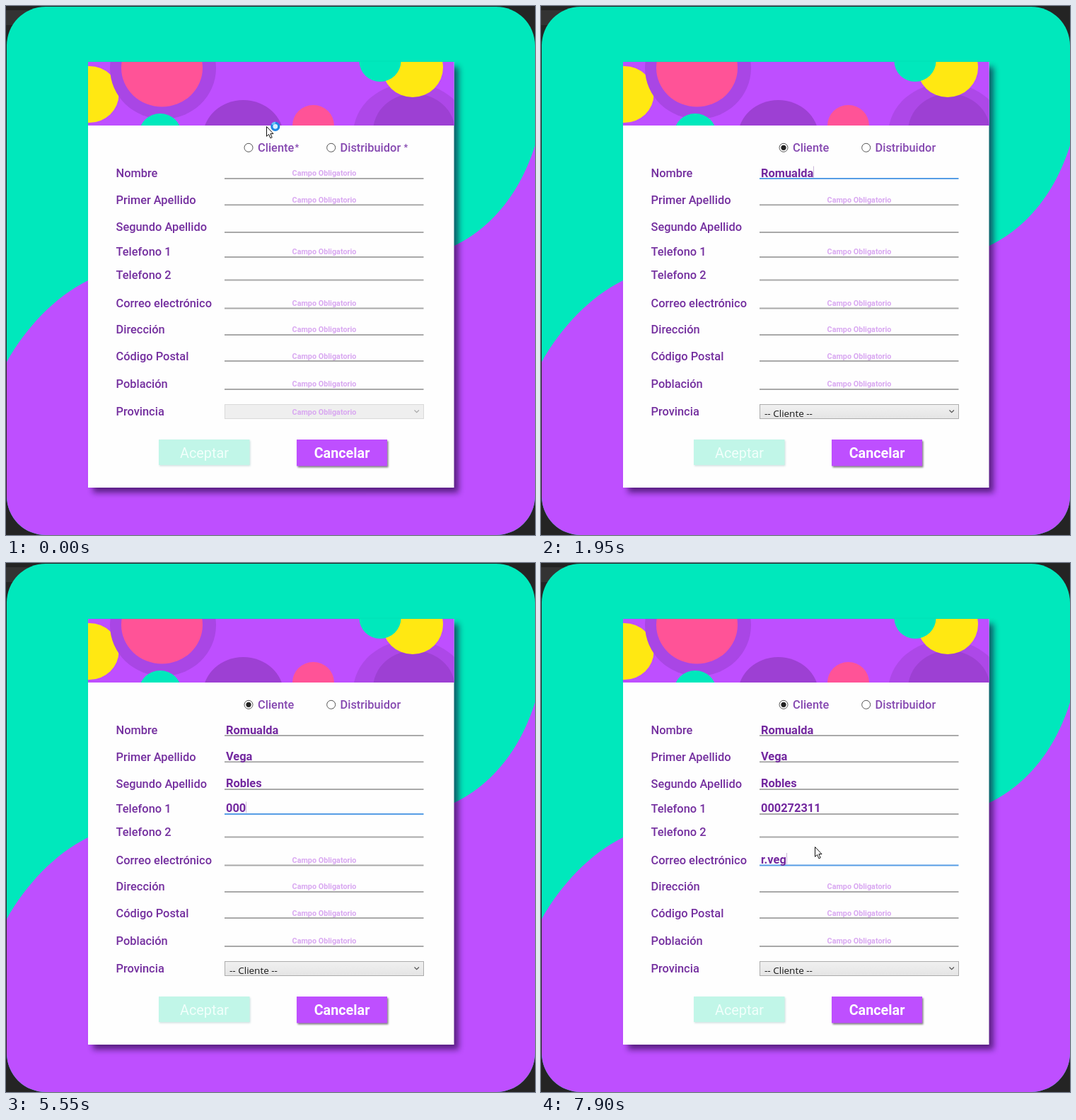
Recreate the animation shown at these times as an HTML page. Size 748x748 px, loop 8000 ms.

```html
<!DOCTYPE html>
<html lang="es">
<head>
<meta charset="utf-8">
<style>
  html, body { margin: 0; width: 100%; height: 100%; overflow: hidden; background: #242424; }
  svg { display: block; width: 100vw; height: 100vh; }
  text { font-family: Roboto, "Open Sans", sans-serif; font-size: 16.4px; white-space: pre; }
  .label { fill: #742f9f; font-weight: 500; }
  .choice { fill: #8548b0; font-weight: 500; }
  .value { fill: #73289f; font-weight: 700; }
  .hint { fill: #d9a8f1; font-weight: 700; font-size: 10.8px; text-anchor: middle; }
  .button { font-size: 19.8px; text-anchor: middle; fill: #fff; }
  .radio { fill: #fff; stroke: #555; }
</style>
</head>
<body>
<svg id="stage" viewBox="0 0 748 748" xmlns="http://www.w3.org/2000/svg">
  <defs>
    <clipPath id="window"><rect x="1" y="1" width="747" height="747" rx="55"/></clipPath>
    <clipPath id="banner"><rect x="116" y="79" width="517.5" height="90"/></clipPath>
    <linearGradient id="selectFill" x2="0" y2="1">
      <stop stop-color="#f0f0f0"/><stop offset="1" stop-color="#e5e5e5"/>
    </linearGradient>
    <filter id="blur" x="-10%" y="-10%" width="120%" height="120%"><feGaussianBlur stdDeviation="4"/></filter>
    <filter id="soft" x="-10%" y="-20%" width="120%" height="150%"><feGaussianBlur stdDeviation="1"/></filter>
  </defs>

  <rect width="748" height="748" fill="#242424"/>
  <rect y="6" width="36" height="21" fill="#333"/>
  <g clip-path="url(#window)">
    <rect width="748" height="748" fill="#00e8bc"/>
    <path d="M0 505C28 455 68 412 116 388L634 339C688 313 728 262 748 197V748H0Z" fill="#be4fff"/>
    <rect x="123" y="86" width="517" height="602" fill="#180030" opacity=".6" filter="url(#blur)"/>
  </g>

  <rect x="116" y="79" width="517.5" height="602" fill="#fefefe"/>
  <g id="bubbles" clip-path="url(#banner)">
    <rect x="116" y="79" width="518" height="90" fill="#be4fff"/>
  </g>

  <circle class="radio" cx="343" cy="200.3" r="6"/>
  <circle class="radio" cx="459.7" cy="200.3" r="6"/>
  <circle id="dot" cx="343" cy="200.3" r="3.6" fill="#222"/>
  <text class="choice" x="356" y="206">Cliente</text>
  <text class="choice" x="472.5" y="206">Distribuidor</text>
  <g id="stars">
    <text class="choice" x="408.5" y="204" style="font-size:13px">*</text>
    <text class="choice" x="562.5" y="204" style="font-size:13px">*</text>
  </g>

  <g id="fields"></g>
  <rect id="caret" width="1" height="16" fill="#c9b5d8"/>

  <text class="label" x="155.5" y="579">Provincia</text>
  <rect id="select" x="309.5" y="563.5" width="281" height="20"/>
  <path id="chevron" d="M577.5 571.5L580.7 574.7 583.9 571.5" fill="none" stroke-width="1.2"/>
  <text id="selectHint" class="hint" x="450" y="577.5">Campo Obligatorio</text>
  <text id="selectText" x="316" y="581" style="font:13.5px 'Open Sans','Noto Sans',sans-serif" fill="#1a1a1a">-- Cliente --</text>

  <rect x="217" y="614.5" width="128.5" height="36" fill="#9bb" opacity=".45" filter="url(#soft)"/>
  <rect x="216" y="613" width="128.5" height="36" fill="#c1f6e8"/>
  <text class="button" x="280.5" y="638.5" style="fill:#f1fffb">Aceptar</text>
  <rect x="412.5" y="615" width="128" height="37.5" fill="#333" opacity=".6" filter="url(#soft)"/>
  <rect x="411" y="613" width="128" height="37.5" fill="#be4fff"/>
  <text class="button" x="475" y="638.5" font-weight="700">Cancelar</text>

  <g id="cursor">
    <path d="M.5 .5V14.3L3.6 11.4 5.9 16.8 8.2 15.8 5.9 10.6H10Z" fill="#fff" stroke="#111"/>
    <g id="busy">
      <circle cx="12.8" cy=".3" r="5" fill="#d8efff" stroke="#1f88e5" stroke-width="3.2"/>
      <path d="M8.5 -2.2A5 5 0 0 1 13 -4.7" fill="none" stroke="#69c4f7" stroke-width="3"/>
    </g>
  </g>
</svg>

<script>
const LOOP = 8000, STEP = 50;
const $ = id => document.getElementById(id);

function add(parent, tag, attrs, text = '') {
  const el = document.createElementNS('http://www.w3.org/2000/svg', tag);
  for (const key in attrs) el.setAttribute(key, attrs[key]);
  el.textContent = text;
  return parent.appendChild(el);
}

const show = (el, on) => el.setAttribute('visibility', on ? 'visible' : 'hidden');

// Banner bubbles: centre, radii, colour
[
  [118, 125, 41.5, 40, '#ffe812'],
  [222, 88, 75, 72, '#a946e5'],
  [220.5, 87.5, 57.5, 55, '#ff5397'],
  [335.5, 185, 57, 52, '#9d40d3'],
  [218, 181, 30, 29, '#00e8bc'],
  [434.5, 169, 29.5, 29, '#ff5397'],
  [573, 181, 82, 72, '#ad48e8'],
  [577, 177, 58, 53, '#9d40d3'],
  [575, 87, 43, 42, '#ffe812'],
  [529, 78, 29.5, 29, '#00e8bc']
].forEach(([cx, cy, rx, ry, fill]) => add($('bubbles'), 'ellipse', { cx, cy, rx, ry, fill }));

// Label, label baseline, underline y, required, typed value, time of each keystroke
const fields = [
  ['Nombre', 242, 244, true, 'Romualda', [1150, 1300, 1500, 1600, 1750, 1800, 1900, 1950]],
  ['Primer Apellido', 279.5, 281.2, true, 'Vega', [2400, 2500, 2700, 2800]],
  ['Segundo Apellido', 317.5, 320, false, 'Robles', [3350, 3450, 3550, 3650, 3750, 3850]],
  ['Telefono 1', 352.5, 355, true, '000272311', [5050, 5200, 5500, 5650, 5750, 5800, 5900, 6050, 6200]],
  ['Telefono 2', 386, 387.5, false],
  ['Correo electrónico', 425.5, 427.5, true, 'r.veg', [7400, 7550, 7600, 7700, 7900]],
  ['Dirección', 462.5, 465, true],
  ['Código Postal', 500.5, 502, true],
  ['Población', 540, 542, true]
].map(([label, base, line, required, value = '', keys = []]) => {
  const group = $('fields');
  add(group, 'text', { class: 'label', x: 155.5, y: base }, label);
  return {
    line, required, value, keys,
    rule: add(group, 'path', { d: `M309 ${line}H590.5`, 'stroke-width': 2 }),
    hint: add(group, 'text', { class: 'hint', x: 450, y: base - 2 }, 'Campo Obligatorio'),
    input: add(group, 'text', { class: 'value', x: 311, y: base - 0.5 })
  };
});

const focusChanges = [[550, 0], [2200, 1], [3150, 2], [4800, 3], [6750, 4], [7050, 5]];
const hiddenSpans = [[1150, 2200], [5050, 6300]];

// Pointer keys: time, x, y
const pointerPath = [
  [0, 368, 170], [150, 342, 198], [350, 342, 198], [450, 344, 215.5],
  [600, 358, 238], [800, 370, 245], [3850, 370, 245], [4150, 400, 193],
  [4500, 400, 193], [4750, 402, 353], [4850, 402, 344], [6300, 390, 349],
  [6550, 390, 349], [6750, 388, 380], [6900, 389, 432], [6950, 389, 432],
  [7050, 387, 401], [8000, 387, 401]
];

function pointerAt(t) {
  const next = Math.max(1, pointerPath.findIndex(p => p[0] > t));
  const [t0, x0, y0] = pointerPath[next - 1], [t1, x1, y1] = pointerPath[next];
  const k = (t - t0) / (t1 - t0);
  return [x0 + (x1 - x0) * k, y0 + (y1 - y0) * k];
}

function render(time) {
  const t = Math.floor(time / STEP) * STEP;
  const chosen = t >= 300;
  const [px, py] = pointerAt(t);
  const pointerOn = !hiddenSpans.some(([from, to]) => t >= from && t < to);
  const focus = focusChanges.reduce((now, [at, index]) => t >= at ? index : now, -1);

  show($('dot'), chosen);
  show($('stars'), !chosen);
  show($('selectHint'), !chosen);
  show($('selectText'), chosen);
  $('select').setAttribute('fill', chosen ? 'url(#selectFill)' : '#efefef');
  $('select').setAttribute('stroke', chosen ? '#acacac' : '#d9d9d9');
  $('chevron').setAttribute('stroke', chosen ? '#555' : '#aaa');

  fields.forEach((f, i) => {
    const typed = f.value.slice(0, f.keys.filter(at => at <= t).length);
    const hover = pointerOn && px > 309 && px < 591 && py > f.line - 20 && py < f.line + 2;
    f.input.textContent = typed;
    show(f.hint, f.required && !typed);
    f.rule.setAttribute('stroke', i === focus ? '#569de5' : hover ? '#7eb4ea' : '#a9a9a9');
  });

  const active = fields[focus];
  show($('caret'), active && !(t >= 950 && t < 1150));
  if (active) {
    $('caret').setAttribute('x', 311 + Math.round(active.input.getComputedTextLength()));
    $('caret').setAttribute('y', active.line - 17.5);
  }

  $('cursor').setAttribute('transform', `translate(${px} ${py})`);
  show($('cursor'), pointerOn);
  show($('busy'), t < 100);
}

const start = performance.now();
function tick() {
  render((performance.now() - start) % LOOP);
  requestAnimationFrame(tick);
}
tick();
</script>
</body>
</html>
```
